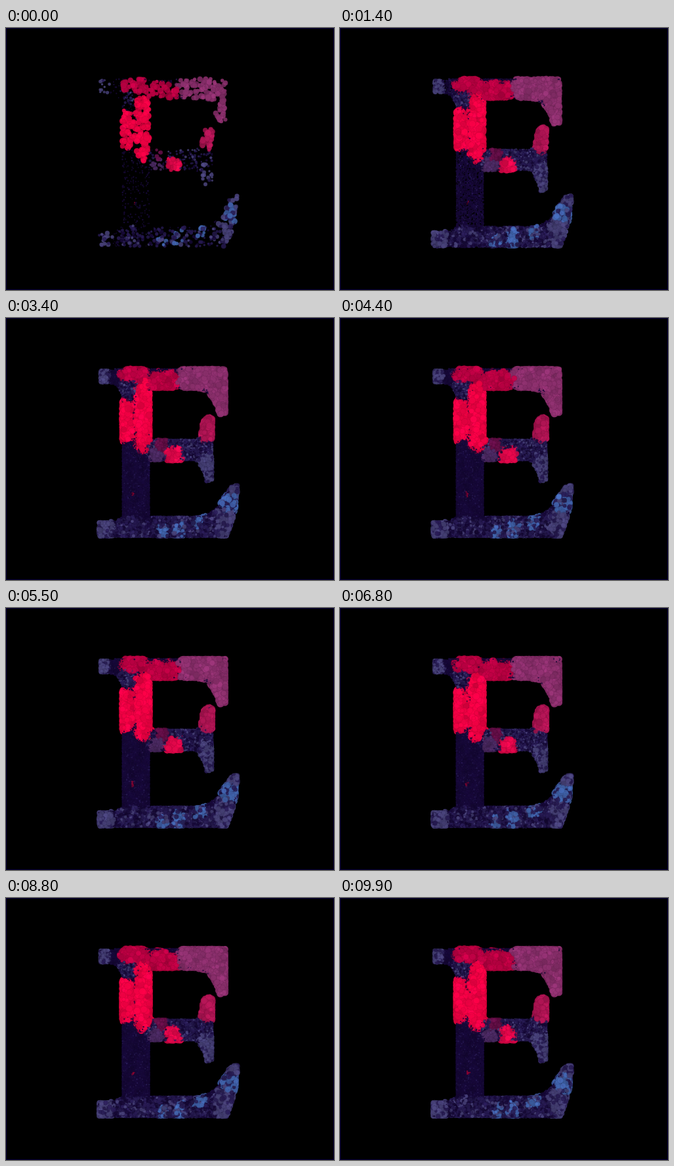
Animation of 500 by 399 pixels, one loop 10000 ms. Source, as an HTML page with a canvas:

```html
<!DOCTYPE html>
<html lang="en">
<head>
<meta charset="utf-8">
<title>Dotted letter</title>
<style>
html, body { margin: 0; width: 100%; height: 100%; overflow: hidden; background: #000; }
canvas { display: block; }
</style>
</head>
<body>
<canvas id="stage" width="500" height="399"></canvas>
<script>
const ctx = document.getElementById('stage').getContext('2d');
const STEP = 100, STEPS = 100, DOTS = 1150;

const letter = new Path2D(`M143 79 L165 78 H334 V145 L325 147 C321 123 306 107 284 107
  H219 V185 H285 Q296 185 298 174 L301 155 L309 151 L314 154 V247 L306 249
  Q298 217 284 217 H218 V304 H285 Q312 304 331 275 L343 257 L353 255
  L350 292 L337 333 H142 V311 Q177 311 177 300 V122 Q177 99 144 98 Z`);

const RED = [255, 0, 72], CRIMSON = [195, 0, 70], ROSE = [184, 22, 88],
  PURPLE = [146, 50, 114], PLUM = [104, 16, 74], BLUE = [68, 104, 180],
  SLATE = [74, 68, 124], INDIGO = [40, 27, 84], NIGHT = [23, 9, 56];

// x, y, half width, half height, colour, dot radius
const zones = [
  [209, 149, 12, 50, RED, 5.2],
  [183, 156, 12, 29, RED, 5.2],
  [195, 87, 20, 10, CRIMSON, 5],
  [236, 96, 27, 13, CRIMSON, 4.8],
  [300, 92, 39, 18, PURPLE, 4.6],
  [326, 120, 14, 34, PURPLE, 4.6],
  [308, 168, 12, 19, ROSE, 4.8],
  [256, 208, 11, 10, [235, 8, 78], 5],
  [237, 192, 8, 11, PLUM, 3.2],
  [340, 281, 12, 13, BLUE, 4.4],
  [239, 324, 8, 10, BLUE, 3.6],
  [264, 321, 9, 13, BLUE, 3.6],
  [296, 310, 9, 10, BLUE, 3.6],
  [348, 262, 9, 11, SLATE, 4],
  [149, 89, 9, 12, SLATE, 2.7],
  [152, 321, 12, 14, SLATE, 3.6],
  [306, 230, 12, 23, SLATE, 3],
  [333, 312, 14, 23, SLATE, 3.8],
  [229, 208, 11, 10, [78, 44, 102], 3.2],
  [194, 267, 2, 4, [140, 6, 52], 1.1],
  [192, 320, 23, 16, INDIGO, 2.8],
  [270, 320, 65, 18, INDIGO, 2.8],
  [186, 107, 15, 14, INDIGO, 2],
  [265, 200, 52, 19, INDIGO, 2]
];
const cool = [SLATE, BLUE, INDIGO];

const spots = [];
for (let y = 76; y < 336; y += 2)
  for (let x = 140; x < 358; x += 2)
    if (ctx.isPointInPath(letter, x, y)) spots.push([x, y]);

let seed, drawn;

function rnd() {
  seed = (seed + 0x6D2B79F5) | 0;
  let n = Math.imul(seed ^ (seed >>> 15), seed | 1);
  n ^= n + Math.imul(n ^ (n >>> 7), n | 61);
  return ((n ^ (n >>> 14)) >>> 0) / 4294967296;
}

function reset() {
  seed = 4127;
  drawn = -1;
  ctx.fillStyle = '#000';
  ctx.fillRect(0, 0, 500, 399);
  ctx.strokeStyle = '#08003a';
  ctx.lineWidth = 1;
  ctx.strokeRect(0.5, 0.5, 499, 398);
}

// Smooth value from -1 to 1 that drifts slowly with time
function wave(x, y, t) {
  return Math.sin(x * 0.23 + 2 * Math.sin(y * 0.13 + t)) * Math.cos(y * 0.19 - x * 0.07 + t);
}

function zoneAt(x, y, t) {
  const px = x + 2.5 * wave(y, x, t), py = y + 3 * wave(x, y, t);
  const edge = 0.6 + rnd() * 0.7;
  return zones.find(([zx, zy, w, h]) =>
    Math.abs((px - zx) / w) ** 3 + Math.abs((py - zy) / h) ** 3 < edge);
}

// Cool areas are flecked with lighter and darker dots
function tint(zone) {
  if (!zone) return rnd() < 0.06 ? INDIGO : NIGHT;
  const c = zone[4], k = rnd();
  if (!cool.includes(c)) return c;
  if (k < 0.28) return c === INDIGO ? NIGHT : INDIGO;
  return k > 0.85 ? SLATE : c;
}

function shade(c, k, a) {
  return `rgba(${c.map(v => Math.min(255, Math.round(v * k))).join()},${a})`;
}

function dot(t) {
  const [gx, gy] = spots[Math.floor(rnd() * spots.length)];
  const x = gx + rnd() - 0.5, y = gy + rnd() - 0.5;
  const zone = zoneAt(x, y, t), c = tint(zone);
  const r = (zone ? zone[5] : 1.3) * (0.55 + rnd() * 0.5);
  ctx.beginPath();
  ctx.arc(x, y, r, 0, Math.PI * 2);
  ctx.fillStyle = shade(c, 0.88 + 0.1 * wave(x, y, t) + rnd() * 0.16, 0.85);
  ctx.fill();
  if (r > 1.8) {
    ctx.strokeStyle = shade(c, 0.65, 0.4);
    ctx.lineWidth = 0.6;
    ctx.stroke();
  }
}

function frame() {
  const step = Math.floor(performance.now() / STEP) % STEPS;
  if (step < drawn) reset();
  while (drawn < step) {
    drawn++;
    for (let i = 0; i < DOTS; i++) dot(drawn * 0.06);
  }
  requestAnimationFrame(frame);
}

reset();
frame();
</script>
</body>
</html>
```
